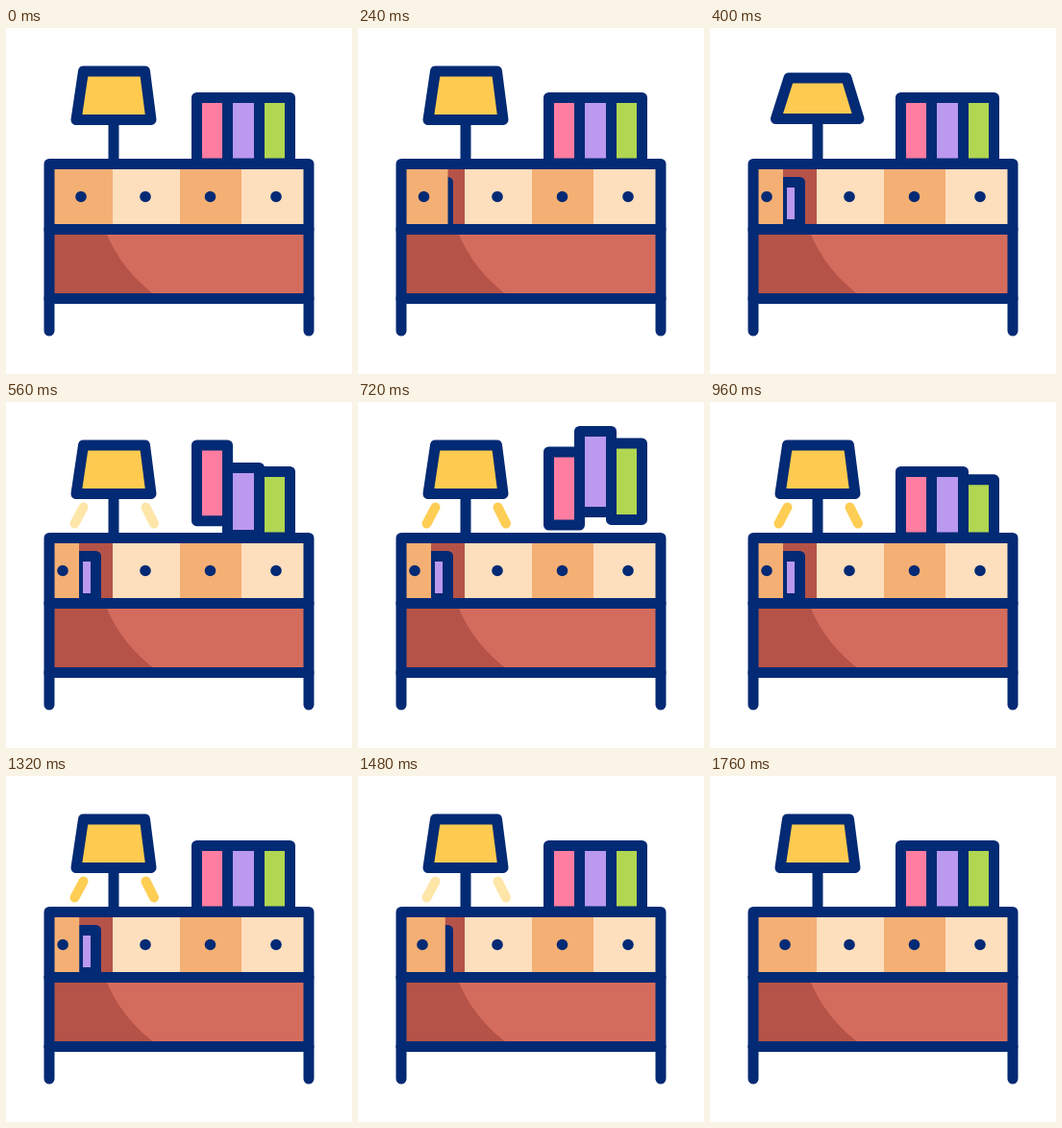
Write an HTML page with a canvas that moves like this. It is 360x360 px and loops after 2000 ms.

```html
<!DOCTYPE html>
<html lang="en">
<head>
<meta charset="utf-8">
<title>Dresser</title>
<style>
html, body { margin: 0; width: 100%; height: 100%; overflow: hidden; background: #fff; }
canvas { display: block; width: 360px; height: 360px; }
</style>
</head>
<body>
<canvas id="stage" width="360" height="360"></canvas>
<script>
const ctx = document.getElementById('stage').getContext('2d');
const LOOP = 2000, STEP = 40, LINE = 11;
const NAVY = '#032a74', ORANGE = '#f4b074', CREAM = '#fddfbd';
const BRICK = '#b55348', RED = '#d46c5d', YELLOW = '#fecb50', PURPLE = '#ba99ef';

const BOOKS = [
  { left: 198.5, right: 230.5, color: '#ff7da0', delay: 0, height: 42 },
  { left: 230.5, right: 263.5, color: PURPLE, delay: 80, height: 42 },
  { left: 263.5, right: 295.5, color: '#b0d652', delay: 160, height: 45 }
];

const lerp = (a, b, k) => a + (b - a) * k;

// Eased 0..1 progress of t between two times.
function ease(t, from, to) {
  const k = Math.min(1, Math.max(0, (t - from) / (to - from)));
  return (1 - Math.cos(Math.PI * k)) / 2;
}

function ramp(t, from, to) {
  return Math.min(1, Math.max(0, (t - from) / (to - from)));
}

function rect(left, top, right, bottom, color) {
  ctx.fillStyle = color;
  ctx.fillRect(left, top, right - left, bottom - top);
}

function dot(x, y) {
  ctx.fillStyle = NAVY;
  ctx.beginPath();
  ctx.arc(x, y, 5.8, 0, Math.PI * 2);
  ctx.fill();
}

function path(points, { fill, stroke = NAVY, width = LINE } = {}) {
  ctx.beginPath();
  points.forEach(([x, y]) => ctx.lineTo(x, y));
  if (fill) {
    ctx.closePath();
    ctx.fillStyle = fill;
    ctx.fill();
  }
  ctx.strokeStyle = stroke;
  ctx.lineWidth = width;
  ctx.stroke();
}

function box(left, top, right, bottom, fill) {
  path([[left, top], [right, top], [right, bottom], [left, bottom]], { fill });
}

// Jump, land with a dip, recover.
function jump(t, height) {
  const dip = -10;
  if (t < 640) return height * ease(t, 440, 640);
  if (t < 820) return lerp(height, dip, ease(t, 640, 820));
  return dip * (1 - ease(t, 820, 880));
}

function drawBooks(t) {
  for (const { left, right, color, delay, height } of BOOKS) {
    const lift = jump(t - delay, height);
    box(left, 72.5 - lift, right, 141 - 0.63 * Math.max(0, lift), color);
  }
}

function drawLamp(t) {
  const squash = ease(t, 280, 400) * (1 - ease(t, 400, 520));
  const glow = ramp(t, 480, 640) * (1 - ramp(t, 1320, 1640));
  const top = lerp(45, 52, squash), bottom = lerp(95.5, 94.5, squash);

  path([[112, bottom], [112, 141]]);
  path([
    [lerp(80.5, 82, squash), top],
    [lerp(144.5, 142, squash), top],
    [lerp(151, 155, squash), bottom],
    [lerp(73, 68.5, squash), bottom]
  ], { fill: YELLOW });

  if (glow > 0) {
    ctx.globalAlpha = glow;
    const ray = { stroke: '#fecd54', width: 10 };
    path([[80.5, 109.5], [71.5, 126.5]], ray);
    path([[145.5, 109.5], [154, 126.5]], ray);
    ctx.globalAlpha = 1;
  }
}

function drawTopDrawers(t) {
  const open = ease(t, 100, 380) * (1 - ease(t, 1300, 1700));

  rect(45, 142, 111, 210, BRICK);
  box(74.5, 160.5, 93.5, 204.5, PURPLE);
  rect(45, 142, lerp(111, 76, open), 210, ORANGE);
  rect(111, 142, 181, 210, CREAM);
  rect(181, 142, 245, 210, ORANGE);
  rect(245, 142, 315, 210, CREAM);

  dot(lerp(78, 59, open), 175.5);
  [145, 212.5, 281].forEach(x => dot(x, 175.5));
}

function drawBottomDrawer() {
  rect(45, 210, 315, 282, RED);
  ctx.fillStyle = BRICK;
  ctx.beginPath();
  ctx.moveTo(45, 210);
  ctx.lineTo(103, 210);
  ctx.quadraticCurveTo(119, 252, 159, 281);
  ctx.lineTo(45, 281);
  ctx.fill();
}

function drawFrame() {
  path([[45, 315], [45, 141.5], [315, 141.5], [315, 315]]);
  path([[45, 209.5], [315, 209.5]]);
  path([[45, 281.5], [315, 281.5]]);
}

function draw(t) {
  rect(0, 0, 360, 360, '#fff');
  ctx.lineCap = ctx.lineJoin = 'round';
  drawBooks(t);
  drawLamp(t);
  drawTopDrawers(t);
  drawBottomDrawer();
  drawFrame();
}

let start;
function tick(now) {
  start ??= now;
  const t = (now - start) % LOOP;
  draw(Math.floor(t / STEP) * STEP);
  requestAnimationFrame(tick);
}
draw(0);
requestAnimationFrame(tick);
</script>
</body>
</html>
```
